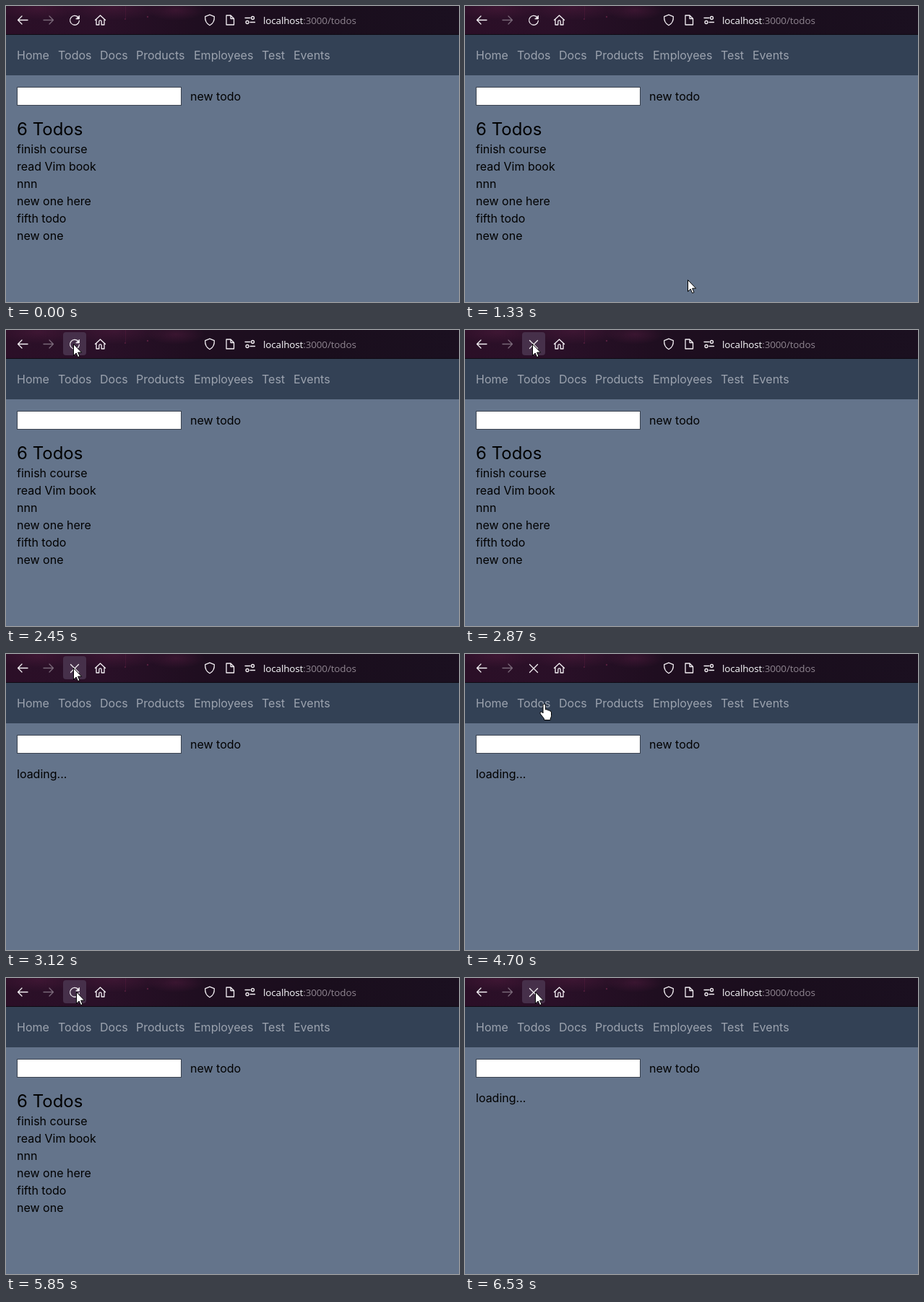
Write an HTML page that moves like this. It is 627x410 px and loops after 8000 ms.

```html
<!DOCTYPE html>
<html lang="en">
<head>
<meta charset="utf-8">
<title>Todos</title>
<style>
html, body { margin: 0; width: 100%; height: 100%; overflow: hidden; background: #64748b; }
svg { display: block; }
text { font: 16px Inter, sans-serif; font-optical-sizing: none; white-space: pre; }
#nav text { fill: #9ca3af; }
#todos .title { font-size: 24px; }
.url { font: 13.4px "Open Sans", "Noto Sans", sans-serif; fill: #8f8590; letter-spacing: -.1px; }
.url tspan { fill: #fbfbfe; }
.icon { fill: none; stroke: #f4f0f4; stroke-width: 1.3; stroke-linecap: round; stroke-linejoin: round; }
.cursor { fill: #fff; stroke: #000; stroke-width: 1; stroke-linejoin: round; }
</style>
</head>
<body>
<svg width="627" height="410" viewBox="0 0 627 410">
  <defs>
    <linearGradient id="bar">
      <stop offset="0" stop-color="#2b0f27"/>
      <stop offset=".2" stop-color="#2a1028"/>
      <stop offset=".42" stop-color="#1f0e20"/>
      <stop offset=".7" stop-color="#1a0e1d"/>
      <stop offset="1" stop-color="#1b1020"/>
    </linearGradient>
    <radialGradient id="glow">
      <stop offset="0" stop-color="#4a1a3a" stop-opacity=".6"/>
      <stop offset="1" stop-color="#4a1a3a" stop-opacity="0"/>
    </radialGradient>
  </defs>

  <rect width="627" height="40" fill="url(#bar)"/>
  <g fill="url(#glow)">
    <ellipse cx="45" cy="3" rx="60" ry="16"/>
    <ellipse cx="150" cy="2" rx="70" ry="18"/>
    <ellipse cx="235" cy="6" rx="40" ry="14"/>
  </g>
  <g fill="#6b2549" opacity=".7">
    <circle cx="165" cy="18" r="1"/>
    <circle cx="196" cy="15" r="1.2"/>
    <rect x="165" width=".8" height="17" opacity=".5"/>
  </g>
  <rect y="39" width="627" height="1" fill="#0f0a13"/>

  <rect id="hover" x="79" y="3" width="32" height="32" rx="4"/>
  <g class="icon">
    <path d="M30 19.5H16.5M22 14l-5.500 5.500 5.500 5.500"/>
    <path d="M52 19.500h13.500M60 14l5.500 5.500-5.500 5.500" opacity=".4"/>
    <g id="reload">
      <path d="M100.300 16.200A6.400 6.400 0 1 0 101.400 20.500"/>
      <path d="M101.500 13.500v4.500h-4.500z" fill="#f4f0f4" stroke-width=".8"/>
    </g>
    <path id="stop" d="M89.500 14.500l11 11M100.500 14.500l-11 11"/>
    <path d="M123.500 19.500l7-6.500 7 6.500M125 18.500v7.500h3.800v-4.500a1.700 1.700 0 0 1 3.400 0v4.500h3.800v-7.500"/>
    <path d="M282 12.200l6.300 2.400c.4 5.500-1.300 9.500-6.300 12.200-5-2.700-6.700-6.700-6.300-12.200z"/>
    <path d="M305 13h6l4.500 4.500v8.500h-10.500zM311 13v4.500h4.500"/>
    <path d="M331 16.500h7M338 22.500h6.500"/>
    <circle cx="341.500" cy="16.500" r="2"/>
    <circle cx="334" cy="22.500" r="2"/>
  </g>
  <text class="url" x="356" y="25"><tspan>localhost</tspan>:3000/todos</text>

  <rect y="40" width="627" height="56" fill="#334155"/>
  <g id="nav"></g>
  <rect x="15.500" y="112.500" width="227" height="25" fill="#fff" stroke="#3b4350"/>
  <text x="255" y="131">new todo</text>
  <g id="todos"><text class="title" x="15" y="179">6 Todos</text></g>
  <text id="loading" x="15" y="172">loading...</text>

  <path id="arrow" class="cursor" d="M.5.5V16.500l3.700-3.500 2.400 5.600 2.400-1-2.400-5.500h5z"/>
  <path id="hand" class="cursor" d="M-1 12V2a1.700 1.700 0 0 1 3.400 0V8q2.800-.8 3.200 1 2.400-.7 2.800 1 2.100-.4 2.100 2v4.500q0 2-1.300 3.700v2.300H.5v-2l-5.200-6.500q-1.200-2.400.8-3 1.400-.1 2.900 2z"/>
  <path id="beam" d="M0 .5h2.500l1 1 1-1H7M3.500 1.500v13M0 15.500h2.500l1-1 1 1H7" fill="none" stroke="#000"/>
</svg>
<script>
const LOOP = 8000;
const $ = id => document.getElementById(id);

function addText(parent, x, y, label) {
  const el = document.createElementNS("http://www.w3.org/2000/svg", "text");
  el.setAttribute("x", x);
  el.setAttribute("y", y);
  el.textContent = label;
  parent.append(el);
}

const links = { Home: 15, Todos: 72, Docs: 130, Products: 180, Employees: 260, Test: 354, Events: 398 };
for (const label in links) addText($("nav"), links[label], 74, label);

["finish course", "read Vim book", "nnn", "new one here", "fifth todo", "new one"]
  .forEach((label, i) => addText($("todos"), 15, 204 + 24 * i, label));

// Pointer: [time, shape, x, y]
const pointer = [
  [0, "", 0, 0],
  [1330, "arrow", 308, 379],
  [1480, "arrow", 176, 279],
  [1600, "arrow", 145, 215],
  [1720, "arrow", 124, 171],
  [1870, "beam", 120, 112],
  [2020, "arrow", 122, 82],
  [2150, "arrow", 112, 50],
  [2300, "arrow", 94, 18],
  [2450, "arrow", 93, 19],
  [4700, "hand", 109, 69],
  [4820, "arrow", 115, 84],
  [5490, "hand", 112, 67],
  [5610, "arrow", 106, 44],
  [5730, "arrow", 99, 24],
  [5850, "arrow", 97, 19]
];
// Reload button background: [time, fill]
const button = [
  [0, "none"], [2300, "#46304a"], [2750, "#5c4860"], [2870, "#46304a"],
  [4700, "none"], [5730, "#46304a"]
];
// Page and toolbar icon: [time, is loading]
const icon = [[0, false], [2870, true], [4940, false], [6410, true]];
const page = [[0, false], [3120, true], [4940, false], [6530, true]];

const at = (steps, t) => steps.findLast(s => s[0] <= t);
const show = (id, on) => $(id).setAttribute("visibility", on ? "visible" : "hidden");

function draw(t) {
  const [, shape, x, y] = at(pointer, t);
  for (const id of ["arrow", "hand", "beam"]) {
    show(id, id === shape);
    $(id).setAttribute("transform", `translate(${x} ${y})`);
  }
  $("hover").setAttribute("fill", at(button, t)[1]);
  const busy = at(icon, t)[1], waiting = at(page, t)[1];
  show("reload", !busy);
  show("stop", busy);
  show("todos", !waiting);
  show("loading", waiting);
}

const start = performance.now();
function tick() {
  draw((performance.now() - start) % LOOP);
  requestAnimationFrame(tick);
}
draw(0);
requestAnimationFrame(tick);
</script>
</body>
</html>
```
